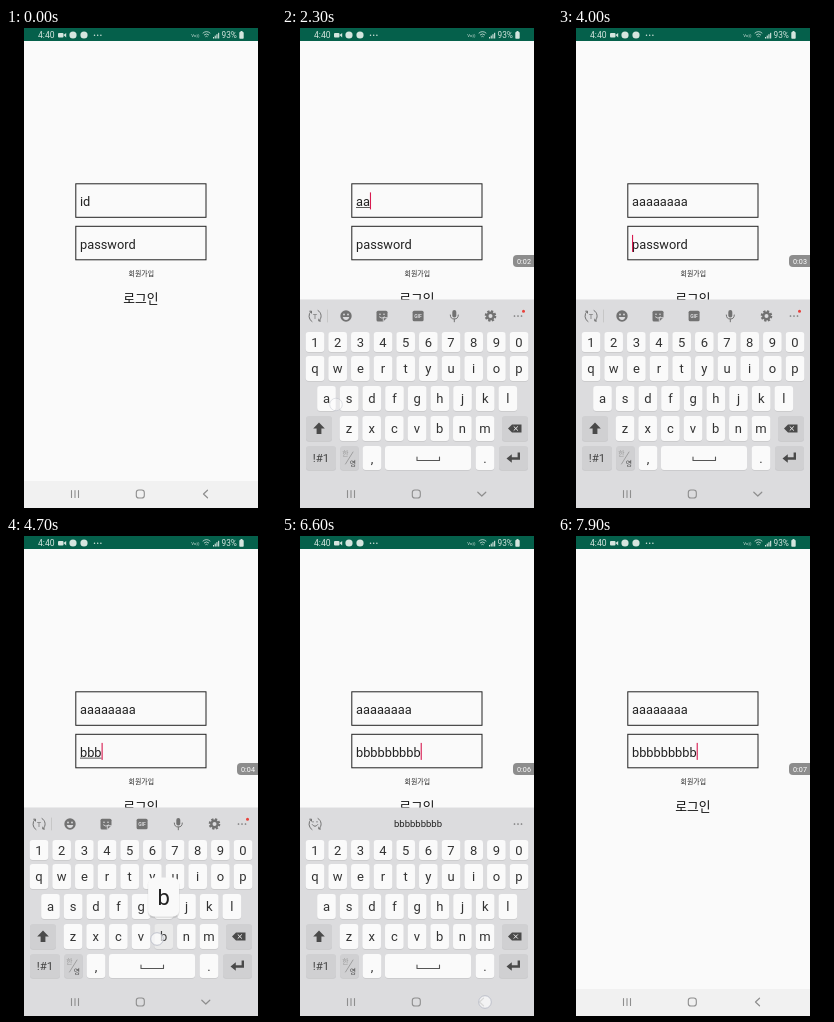
An HTML page for the animation above (8000 ms loop, 270 by 480 pixels).

```html
<!DOCTYPE html>
<html lang="ko">
<head>
<meta charset="utf-8">
<style>
html, body { margin: 0; width: 100%; height: 100%; overflow: hidden; background: #000; }
svg { display: block; width: 100%; height: 100%; }
text { font-family: Roboto, "Noto Sans CJK KR", "Noto Sans CJK", sans-serif; }
.mid { text-anchor: middle; }
.line { fill: none; stroke-linecap: round; stroke-linejoin: round; }
</style>
</head>
<body>
<svg id="stage" viewBox="0 0 270 480">
  <rect width="270" height="480" fill="#000"/>
  <rect x="18" width="234" height="480" fill="#fafafa"/>
  <g id="status"></g>
  <g id="form" fill="#222"></g>
  <g id="keyboard"></g>
  <g id="nav"></g>
  <g id="pill">
    <path d="M252 227h-17a4 4 0 0 0-4 4v4a4 4 0 0 0 4 4h17z" fill="#8d8d8d"/>
    <text id="clock" class="mid" x="242" y="235.7" font-size="7.2" fill="#fff"></text>
  </g>
  <circle id="touch" r="6.3" fill="#fff" fill-opacity=".65" stroke="#b4b8c4" stroke-width=".8"/>
</svg>
<script>
const LOOP = 8000;
const $ = id => document.getElementById(id);
const clamp = v => Math.max(0, Math.min(1, v));

function add(parent, tag, attrs, content) {
  const node = document.createElementNS('http://www.w3.org/2000/svg', tag);
  for (const key in attrs) node.setAttribute(key, attrs[key]);
  if (content) node.textContent = content;
  return parent.appendChild(node);
}
const set = (node, attrs) => { for (const key in attrs) node.setAttribute(key, attrs[key]); };
const show = (node, on) => node.setAttribute('visibility', on ? 'inherit' : 'hidden');
const box = (p, x, y, width, height, fill, rx = 0) => add(p, 'rect', { x, y, width, height, fill, rx });
const dot = (p, cx, cy, r, fill) => add(p, 'circle', { cx, cy, r, fill });
const label = (p, x, y, size, fill, s, cls = 'mid') =>
  add(p, 'text', { x, y, 'font-size': size, fill, class: cls }, s);
const line = (p, d, stroke, width = 1) =>
  add(p, 'path', { d, stroke, 'stroke-width': width, class: 'line' });

function buildStatus() {
  const g = $('status'), ink = '#d5e5df';
  box(g, 18, 0, 234, 13, '#05604b');
  label(g, 32, 10, 8.6, ink, '4:40', '');
  box(g, 52, 5, 5.5, 4.5, ink, 1);
  add(g, 'path', { d: 'M57.5 7l2.7-2v4.5z', fill: ink });
  dot(g, 67, 7, 3.6, ink);
  dot(g, 78, 7, 3.6, ink);
  for (const x of [88.5, 91.7, 94.9]) dot(g, x, 7.3, .75, ink);
  label(g, 189.5, 9, 4.4, ink, 'Vo))', 'mid');
  line(g, 'M197 5q3.5-3 7 0M198.3 6.8q2.2-2 4.4 0M199.7 8.5q.8-.8 1.6 0', ink, .8);
  for (let i = 0; i < 4; i++) box(g, 207 + i * 1.7, 9 - i * 1.4, 1.1, 1.5 + i * 1.4, ink);
  label(g, 215.5, 10, 8.3, ink, '93%', '');
  box(g, 233.3, 4, 4.4, 6.8, ink, .8);
  box(g, 234.5, 3, 2, 1.2, ink);
}

function buildField(y) {
  const g = $('form');
  add(g, 'rect', { x: 69.8, y, width: 130.2, height: 33.5, fill: 'none', stroke: '#222', 'stroke-width': 1 });
  return {
    text: label(g, 74, y + 22.2, 12.8, '#222', '', ''),
    rule: box(g, 74, y + 23.4, 0, .8, '#333'),
    cursor: box(g, 74, y + 8.6, 1.1, 17, '#d81b50')
  };
}

function key(g, cx, y, w, h, s, fill = '#fafafa') {
  box(g, cx - w / 2, y + .7, w, h, '#c6c6c8', 3);
  box(g, cx - w / 2, y, w, h, fill, 3);
  if (s) label(g, cx, y + h / 2 + 4.5, 13, '#333', s);
}

function buildKeys(g) {
  const row = (s, x, y, h) => [...s].forEach((c, i) => key(g, x + i * 22.67, y, 18.6, h, c));
  const special = '#d0d0d2', ink = '#4a4a4a';
  row('1234567890', 33, 304, 20);
  row('qwertyuiop', 33, 328, 25);
  row('asdfghjkl', 44.5, 358, 25);
  row('zxcvbnm', 67, 388, 25);
  key(g, 37, 388, 26, 25, '', special);
  add(g, 'path', { d: 'M37 394.5l5.8 6h-3.4v5.5h-4.8v-5.5h-3.4z', fill: ink });
  key(g, 233, 388, 26, 25, '', special);
  add(g, 'path', { d: 'M226 400.5l4-4h9.5v8h-9.5z', fill: ink });
  line(g, 'M232 398.7l3.6 3.6m0-3.6l-3.6 3.6', '#eee', 1);
  key(g, 39, 418, 30, 24, '', special);
  label(g, 39, 434.2, 11.5, '#444', '!#1');
  key(g, 67.5, 418, 18.6, 24, '', special);
  label(g, 63.5, 428, 6.8, '#999', '한');
  line(g, 'M63.5 436l7.5-12', '#888', .7);
  label(g, 71, 438, 6.8, '#444', '영');
  key(g, 90, 418, 18.6, 24, ',');
  key(g, 146, 418, 86, 24);
  line(g, 'M135 429v3.5h22.5v-3.5', '#555', 1.1);
  key(g, 203, 418, 18.6, 24, '.');
  key(g, 231.5, 418, 29, 24, '', special);
  add(g, 'path', { d: 'M238 424.5v7.2h-8.2v3l-5.3-4.2 5.3-4.2v3h5.8v-4.8z', fill: ink });
}

function cycleArrows(g, ink) {
  line(g, 'M30 293.6a6.3 6.3 0 0 1-1-10.2M36 282.5a6.3 6.3 0 0 1 1.2 10.2M27.7 283.2l1.8-.1v2M38.6 293l-1.8.1v-2', ink, 1);
}

function buildTools(g) {
  const ink = '#727272', back = '#dcdcde';
  cycleArrows(g, ink);
  label(g, 33, 291, 7.5, ink, 'T');
  line(g, 'M45.5 282v12', '#c2c2c2', .8);
  dot(g, 64, 288, 5.7, ink);
  dot(g, 62, 286.5, .9, back);
  dot(g, 66, 286.5, .9, back);
  add(g, 'path', { d: 'M60.7 289h6.6q-.8 3-3.3 3t-3.3-3z', fill: back });
  add(g, 'path', { d: 'M96 282.7h8q1.5 0 1.5 1.5v5.3l-4.3 4h-5.2q-1.5 0-1.5-1.5v-7.8q0-1.5 1.5-1.5z', fill: ink });
  line(g, 'M97.5 289q2.4 2.6 5 0M101.3 293v-3.3h4', back, .9);
  dot(g, 98, 286.3, .8, back);
  dot(g, 102, 286.3, .8, back);
  box(g, 130.6, 282.8, 11, 10.5, ink, 1.5);
  label(g, 136, 290, 5, back, 'GIF').setAttribute('font-weight', 700);
  box(g, 170.3, 282, 4, 7.6, ink, 2);
  line(g, 'M168.3 287q0 4 4 4t4-4M172.3 291v2.8', ink, 1);
  add(g, 'circle', { cx: 208.5, cy: 288, r: 4.6, fill: 'none', stroke: ink, 'stroke-width': 2.4, 'stroke-dasharray': '2.1 1.5' });
  add(g, 'circle', { cx: 208.5, cy: 288, r: 3.2, fill: 'none', stroke: ink, 'stroke-width': 2.4 });
  dot(g, 241.5, 283.3, 1.5, '#e8413c');
}

function buildSuggestions(g) {
  cycleArrows(g, '#727272');
  line(g, 'M30.3 288.6q2.7 3.6 5.4 0M31 285.5v.6M35 285.5v.6', '#727272', 1);
}

function buildNav() {
  const g = $('nav'), ink = '#8e8e8e';
  const back = box(g, 18, 453, 234, 27, '#f1f1f1');
  line(g, 'M65.5 462.5v7M69 462.5v7M72.5 462.5v7', ink, 1.1);
  add(g, 'rect', { x: 130.3, y: 462, width: 8, height: 8, rx: 2.6, fill: 'none', stroke: ink, 'stroke-width': 1.1 });
  return { back, chevron: line(g, '', ink, 1.2) };
}

buildStatus();
const idField = buildField(155.8), passField = buildField(198.3);
label($('form'), 135.3, 248, 6.9, '#222', '회원가입');
label($('form'), 135, 274.9, 12.8, '#111', '로그인');

const board = $('keyboard');
box(board, 18, 271.5, 234, 210, '#dcdcde');
buildKeys(board);
const tools = add(board, 'g', {});
buildTools(tools);
const mailWords = add(board, 'g', {}), passWords = add(board, 'g', {});
buildSuggestions(mailWords);
buildSuggestions(passWords);
label(mailWords, 76.5, 290.5, 6.8, '#333', 'eee@nowm.testh');
label(mailWords, 137.5, 290.3, 6.1, '#444', 'eee@nowm.testyyy');
label(mailWords, 198, 291.3, 9.5, '#222', 'as');
label(passWords, 136, 291.3, 9.5, '#222', 'bbbbbbbbb');
for (const x of [232.5, 236, 239.5]) dot(board, x, 288, .85, '#777');

const pressed = box(board, 0, 358, 18.6, 25, '#8c8c8e', 3);
const popup = add(board, 'g', {});
box(popup, -15.9, -18.3, 31.8, 39.6, '#000', 6).setAttribute('fill-opacity', .1);
box(popup, -15.5, -19.5, 31, 39, '#f9f9f9', 6);
const popupText = label(popup, 0, 7.5, 22, '#222', '');
const nav = buildNav();

// A character is committed when its key is released.
const run = (count, first, step, hold) =>
  Array.from({ length: count }, (_, i) => [first + i * step - hold, first + i * step]);
const aPresses = [[2000, 2095], [2100, 2295], ...run(6, 2480, 164, 150)];
const bPresses = run(9, 4300, 178, 140);
const released = (presses, t) => presses.filter(p => t >= p[1]).length;
const held = (presses, t) => presses.find(p => t >= p[0] && t < p[1]);

// start, end, x, y, fade-out duration
const touches = [
  [200, 400, 100, 174, 150],
  [1600, 2330, 54, 376.5, 60],
  [2330, 3380, 47, 372, 100],
  [3750, 3900, 118, 217, 100],
  [4160, 5790, 151, 403, 100],
  [6150, 6750, 203, 466, 100],
  [7500, 7900, 125, 275.5, 400]
];

function drawField(field, value, hint, state) {
  field.text.textContent = value || hint;
  const width = value ? field.text.getComputedTextLength() : 0;
  field.rule.setAttribute('width', state.composing ? width : 0);
  field.cursor.setAttribute('x', 74 + width);
  show(field.cursor, state.cursor);
}

function boardOffset(t) {
  if (t < 600 || t >= 6900) return 215;
  if (t < 1000) return 182 * (1 - (t - 600) / 400) ** 2;
  return 182 * clamp((t - 6600) / 300) ** 2;
}

function draw(t) {
  const inPassword = t >= 3850;
  const blink = (t >= 1100 && t < 1200) || (t >= 7100 && t < 7200);
  const cursor = t >= 300 && !blink;
  drawField(idField, 'a'.repeat(released(aPresses, t)), 'id',
    { composing: !inPassword, cursor: cursor && !inPassword });
  drawField(passField, 'b'.repeat(released(bPresses, t)), 'password',
    { composing: t < 6500, cursor: cursor && inPassword });

  const open = t >= 600 && t < 6900;
  show(board, open);
  board.setAttribute('transform', `translate(0 ${boardOffset(t)})`);
  const mail = t >= 3000 && t < 3850, pass = t >= 5950;
  show(tools, !mail && !pass);
  show(mailWords, mail);
  show(passWords, pass);

  const a = held(aPresses, t), press = a || held(bPresses, t);
  show(popup, press);
  show(pressed, press);
  if (press) {
    const x = a ? 44.5 : 157.6;
    popup.setAttribute('transform', `translate(${x} ${a ? 331 : 361})`);
    popupText.textContent = a ? 'a' : 'b';
    set(pressed, { x: x - 9.3, y: a ? 358 : 388, opacity: clamp((t - press[0]) / 50) });
  }

  nav.back.setAttribute('fill', open ? '#dcdcde' : '#f1f1f1');
  nav.chevron.setAttribute('d', t >= 600 && t < 6500
    ? 'M195.8 464.2l4 3.8 4-3.8' : 'M201.5 462.2l-4 3.8 4 3.8');

  show($('pill'), t >= 200);
  $('clock').textContent = '0:0' + Math.max(0, Math.floor((t - 100) / 1000));

  const tap = touches.find(p => t >= p[0] && t < p[1]);
  show($('touch'), tap);
  if (tap) set($('touch'), { cx: tap[2], cy: tap[3], opacity: clamp((tap[1] - t) / tap[4]) });
}

function frame() {
  draw(performance.now() % LOOP);
  requestAnimationFrame(frame);
}
frame();
</script>
</body>
</html>
```
